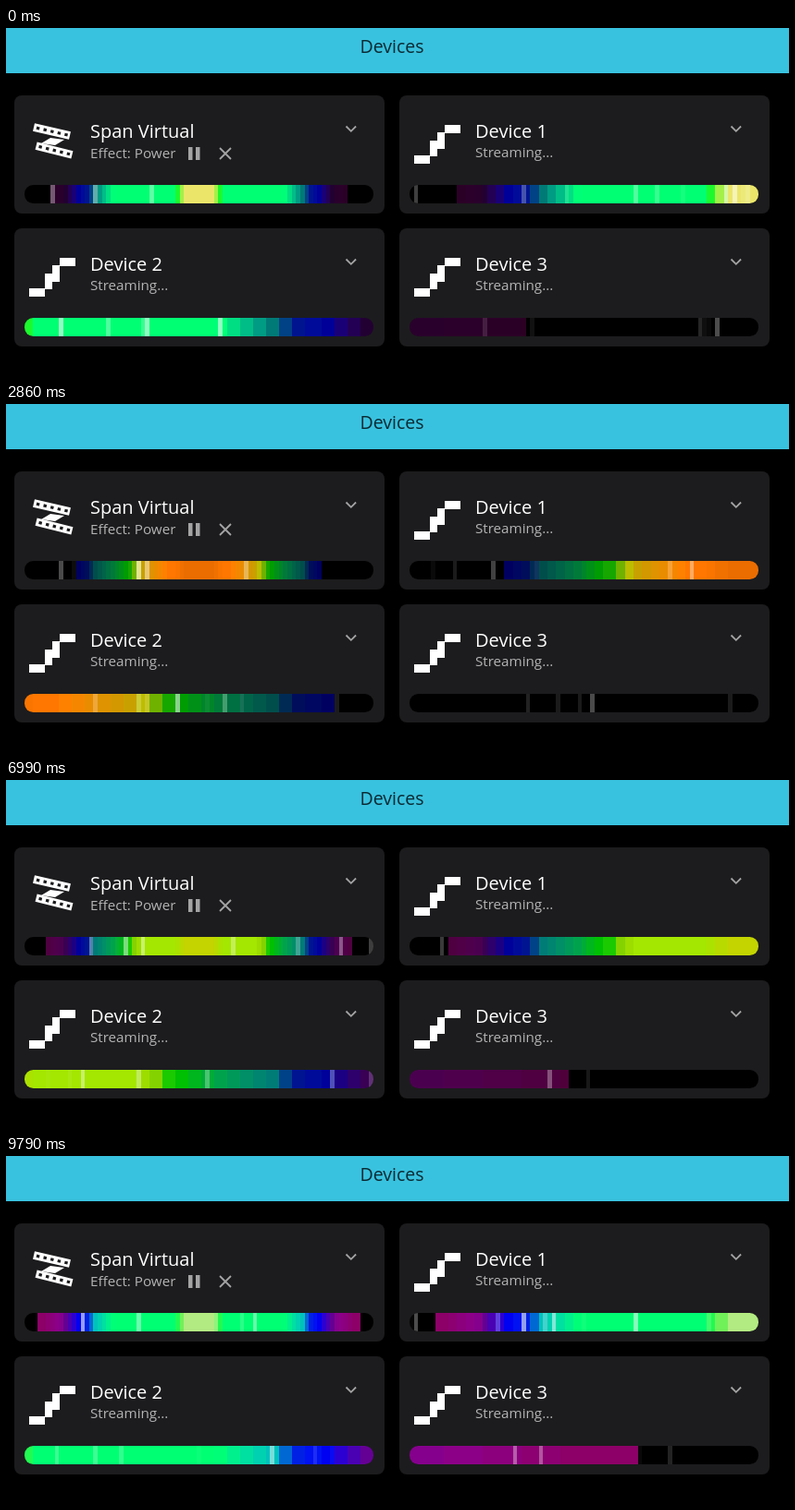
Recreate the animation shown at these times as an HTML page with a canvas. Size 846 by 377 pixels, loop 9.86 s.

```html
<!DOCTYPE html>
<html lang="en">
<head>
<meta charset="utf-8">
<title>Devices</title>
<style>
  html, body { margin: 0; width: 100%; height: 100%; overflow: hidden; background: #000; }
  svg, canvas { position: absolute; left: 0; top: 0; display: block; }
  text { font-family: "Open Sans", "Noto Sans", sans-serif; }
  .head { font-size: 19.5px; fill: #0a2a33; text-anchor: middle; }
  .name { font-size: 20px; font-weight: 500; fill: #fff; }
  .info { font-size: 15.2px; font-weight: 500; fill: #b4b4b5; }
  .tool { fill: none; stroke: #a4a4a5; stroke-width: 1.8; }
</style>
</head>
<body>
<svg width="846" height="377" viewBox="0 0 846 377">
  <defs>
    <g id="card">
      <rect width="400" height="128" rx="8" fill="#1c1c1e"/>
      <path class="tool" d="M358.5 33.5l5.3 5.3 5.3-5.3"/>
    </g>
    <path id="stairs" fill="#fff" d="M16 65h17v9h-17zM33 49h8v17h-8zM41 40h8v18h-8zM49 32h17v9h-17z"/>
    <g id="film">
      <rect x="-20" y="-4.3" width="40" height="8.6" fill="#fff"/>
      <path d="M-17 0h36" stroke="#1c1c1e" stroke-width="3.2" stroke-dasharray="3.4 4.4"/>
    </g>
  </defs>
  <rect width="846" height="49" fill="#39c2df"/>
  <text class="head" x="417" y="27">Devices</text>

  <g transform="translate(9 73)">
    <use href="#card"/>
    <use href="#film" transform="translate(40.5 39) rotate(13)"/>
    <use href="#film" transform="translate(43 59.5) rotate(14)"/>
    <path fill="#fff" d="M29 52l10-6 15 2-10 6z"/>
    <text class="name" x="82" y="46">Span Virtual</text>
    <text class="info" x="82" y="68">Effect: Power</text>
    <path fill="#a4a4a5" d="M188 56h4.5v14h-4.5zM196 56h4.5v14h-4.5z"/>
    <path class="tool" d="M222 57l12 12m0-12l-12 12"/>
  </g>
  <g transform="translate(425 73)">
    <use href="#card"/><use href="#stairs"/>
    <text class="name" x="82" y="46">Device 1</text>
    <text class="info" x="82" y="67">Streaming...</text>
  </g>
  <g transform="translate(9 217)">
    <use href="#card"/><use href="#stairs"/>
    <text class="name" x="82" y="46">Device 2</text>
    <text class="info" x="82" y="67">Streaming...</text>
  </g>
  <g transform="translate(425 217)">
    <use href="#card"/><use href="#stairs"/>
    <text class="name" x="82" y="46">Device 3</text>
    <text class="info" x="82" y="67">Streaming...</text>
  </g>
</svg>
<canvas id="leds" width="846" height="377"></canvas>
<script>
const LOOP = 9860, FRAMES = 141, CELLS = 81, WIDTH = 377, HEIGHT = 20, BANDS = 40;
const ctx = document.getElementById('leds').getContext('2d');

const clamp = v => Math.min(1, Math.max(0, v));
const mix = (a, b, k) => a + (b - a) * k;
const ramp = (a, b, v) => clamp((v - a) / (b - a));

// Each strip maps its own 0..1 position to the spectrum: 0 is the outer end, 1 the middle.
const strips = [
  { x: 20, y: 170, level: p => 1 - Math.abs(p - 0.5) * 2 },
  { x: 436, y: 170, level: p => 1.1 * p - 0.1 * p ** 3 },
  { x: 20, y: 314, level: p => (8 - 6 * p) / 9 },
  { x: 436, y: 314, level: p => (2 - 2 * p) / 9 }
];

// The sound at a few moments: where light starts, brightness of bass and mids,
// the warmest hue reached, and the hue and saturation of the middle.
const moods = [
  { at: 0, edge: 0.148, bass: 0.17, mid: 0.6, cap: 147, core: 58, pure: 0.55 },
  { at: 25, edge: 0.1, bass: 0.32, mid: 0.55, cap: 38, core: 40, pure: 1 },
  { at: 41, edge: 0.3, bass: 0.3, mid: 0.38, cap: 28, core: 28, pure: 1 },
  { at: 65, edge: 0.099, bass: 0.47, mid: 0.97, cap: 142, core: 107, pure: 0.65 },
  { at: 86, edge: 0.072, bass: 0.44, mid: 0.8, cap: 116, core: 92, pure: 1 },
  { at: 115, edge: 0.15, bass: 0.24, mid: 0.53, cap: 36, core: 36, pure: 1 },
  { at: 140, edge: 0.077, bass: 0.55, mid: 0.95, cap: 147, core: 92, pure: 0.45 }
];

// Hue along the spectrum, as [level, degrees].
const hues = [[0.1, 316], [0.2, 297], [0.25, 265], [0.3, 240], [0.36, 230], [0.4, 178],
              [0.5, 148], [0.6, 112], [0.64, 65], [0.68, 46], [0.75, 36], [0.82, 28]];

function hueAt(level) {
  const i = hues.findIndex(h => h[0] >= level);
  if (i === 0) return hues[0][1];
  if (i < 0) return hues[hues.length - 1][1];
  const [a, b] = [hues[i - 1], hues[i]];
  return mix(a[1], b[1], ramp(a[0], b[0], level));
}

function hsv(hue, sat, value) {
  return [5, 3, 1].map(n => {
    const k = (n + hue / 60) % 6;
    return 255 * value * (1 - sat * clamp(Math.min(k, 4 - k)));
  });
}

function noise(a, b, c) {
  const v = Math.sin(a * 12.9898 + b * 78.233 + c * 37.719) * 43758.5453;
  return v - Math.floor(v);
}

function moodAt(frame) {
  const next = Math.max(1, moods.findIndex(m => m.at >= frame));
  const from = moods[next - 1], to = moods[next];
  const k = ramp(from.at, to.at, frame);
  const mood = {};
  for (const key in from) mood[key] = mix(from[key], to[key], k);
  const swing = Math.sin(Math.PI * k), beat = Math.sin(frame * 0.9) ** 2;
  mood.edge += 0.04 * swing * (beat - 0.5);
  mood.power = 1 - 0.12 * swing * beat;
  return mood;
}

function lightAt(level, mood) {
  if (level < mood.edge) return [0, 0, 0];
  const band = Math.floor(level * BANDS) / BANDS;
  const middle = ramp(0.86, 0.92, band);
  const rise = 0.1 + 0.0025 * (147 - mood.cap);
  const low = mix(mood.bass, mood.mid, ramp(0.22, 0.3, band));
  const mid = low * mix(1, 0.8, ramp(0.33, 0.4, band));
  const value = mix(mid, mix(1, 0.92, middle), ramp(0.4, 0.4 + rise, band));
  const hue = mix(Math.max(hueAt(band), mood.cap), mood.core, middle);
  return hsv(hue, mix(1, mood.pure, middle), value * mood.power);
}

function drawStrip(strip, index, frame, mood) {
  ctx.save();
  ctx.beginPath();
  ctx.roundRect(strip.x, strip.y, WIDTH, HEIGHT, 9.5);
  ctx.clip();
  for (let cell = 0; cell < CELLS; cell++) {
    const level = Math.max(0, strip.level((cell + 0.5) / CELLS));
    const chance = noise(frame, cell, index);
    const spark = ramp(0.94, 1, chance) * (level < mood.edge ? 0.3 : 0.6);
    const color = lightAt(level, mood).map(v => Math.round(mix(v, 255, spark)));
    const left = Math.round(cell * WIDTH / CELLS);
    const right = Math.round((cell + 1) * WIDTH / CELLS);
    ctx.fillStyle = `rgb(${color.join()})`;
    ctx.fillRect(strip.x + left, strip.y, right - left, HEIGHT);
  }
  ctx.restore();
}

function draw(now) {
  const time = now % LOOP;
  const frame = Math.min(FRAMES - 1, Math.floor((time + 18) * FRAMES / LOOP));
  const mood = moodAt(frame);
  ctx.clearRect(0, 0, 846, 377);
  strips.forEach((strip, index) => drawStrip(strip, index, frame, mood));
}

const start = performance.now();
function tick() {
  draw(performance.now() - start);
  requestAnimationFrame(tick);
}
tick();
</script>
</body>
</html>
```
